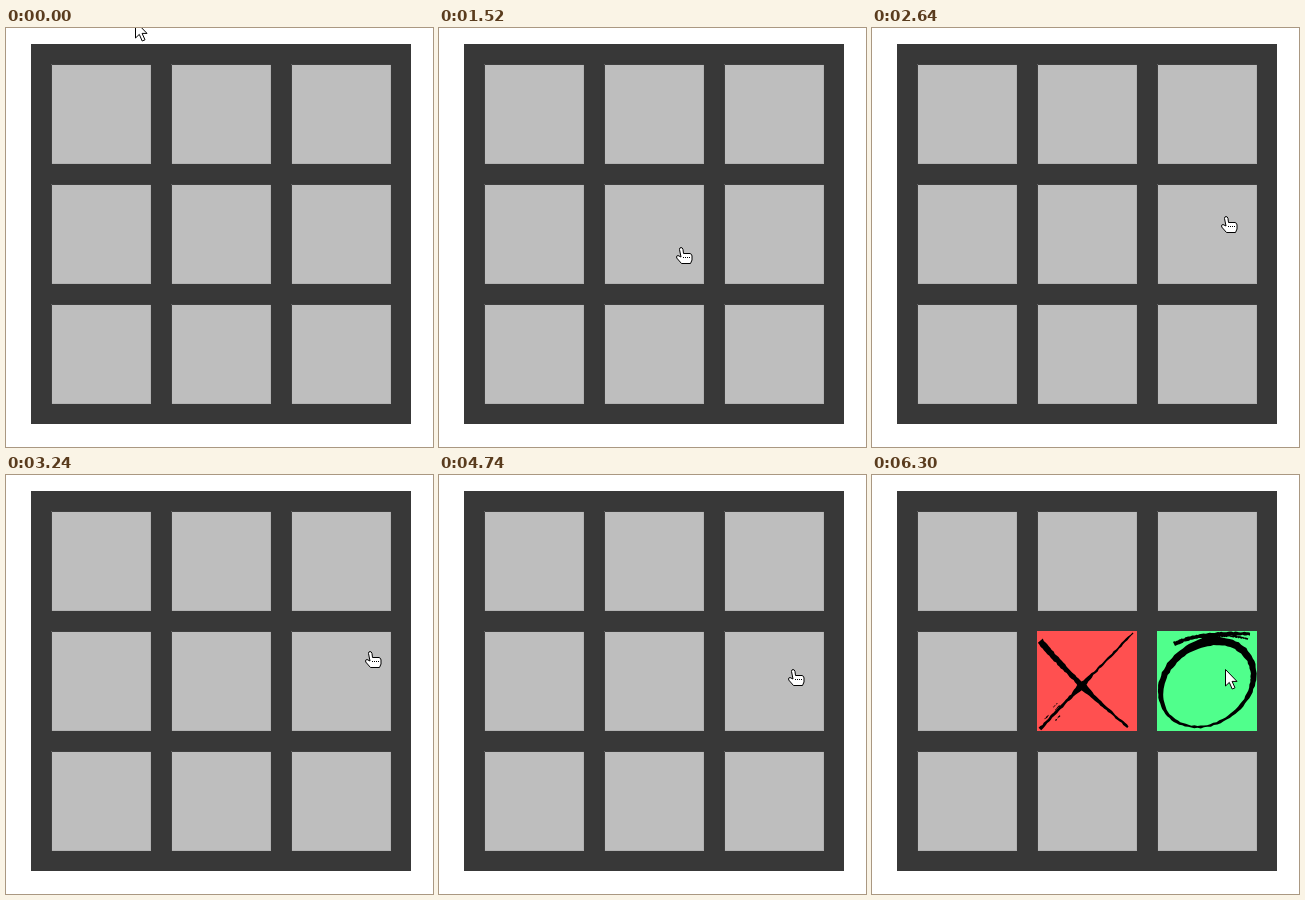
An HTML page for the animation above (8 s loop, 427x419 px).

```html
<!DOCTYPE html>
<html>
<head>
<meta charset="utf-8">
<style>
html, body { margin: 0; width: 100%; height: 100%; overflow: hidden; background: #fff; }
svg { display: block; }
</style>
</head>
<body>
<svg width="427" height="419" viewBox="0 0 427 419">
  <defs>
    <g id="cell">
      <rect width="100" height="100" fill="#b2b2b2"/>
      <rect width="99" height="99" fill="#bebebe"/>
      <path d="M.5 100V.5H100" fill="none" stroke="#404040"/>
    </g>
  </defs>
  <rect x="25" y="16" width="380" height="380" fill="#383838"/>
  <g id="cells"></g>

  <g id="cross" transform="translate(165 156)">
    <rect width="100" height="100" fill="#ff5050"/>
    <path id="crossInk"/>
  </g>
  <g id="ring" transform="translate(285 156)">
    <rect width="100" height="100" fill="#50ff8c"/>
    <path id="ringInk"/>
  </g>

  <path id="arrow" d="M.5 .5V17L4.3 13.4L7.2 20L10 18.8L7.1 12.4H12Z" fill="#fff" stroke="#000" stroke-linejoin="round"/>
  <g id="hand" fill="#fff" stroke="#000" stroke-linejoin="round">
    <path d="M3.5 2.5Q3.5 .5 5 .5T7 2.5L7.5 6.5H14Q16 7 16 9V13L14.5 16.5H5.5L.7 11Q0 8.5 2 8.5L5 10Z"/>
    <path d="M7 10.5H14" stroke-dasharray="1 1"/>
  </g>
</svg>
<script>
const $ = id => document.getElementById(id);
const LOOP = 8000, POINT = 220, GREEN = 5620, RING = 6180, CROSS = 6300;

// Each leg runs from start to end in even steps, then holds
const legs = [
  { start: 0, end: 0, steps: 1, from: [129, -7], to: [129, -7] },
  { start: 120, end: 280, steps: 4, from: [134, 6], to: [148, 42] },
  { start: 960, end: 1240, steps: 5, from: [232, 213], to: [237, 219] },
  { start: 2100, end: 2100, steps: 1, from: [244, 223], to: [244, 223] },
  { start: 2260, end: 2640, steps: 6, from: [283, 222], to: [349, 188] },
  { start: 2660, end: 2920, steps: 4, from: [351, 186], to: [359, 176] },
  { start: 4220, end: 4740, steps: 7, from: [358, 175], to: [349, 194] },
  { start: GREEN, end: GREEN, steps: 1, from: [353, 194], to: [353, 194] }
];

let seed = 7;
const random = () => (seed = seed * 16807 % 2147483647) / 2147483647;
const mix = (a, b, p) => a + (b - a) * p;

// Ragged brush outline along point(p), as thick as width(p)
function brush(point, width, n = 50) {
  const left = [], right = [];
  for (let i = 0; i <= n; i++) {
    const p = i / n, [x, y] = point(p);
    const [ax, ay] = point(p - .01), [bx, by] = point(p + .01);
    const len = Math.hypot(bx - ax, by - ay);
    const nx = (ay - by) / len, ny = (bx - ax) / len;
    const side = sign => {
      const w = sign * (width(p) / 2 + random() - .5);
      return `${(x + nx * w).toFixed(1)} ${(y + ny * w).toFixed(1)}`;
    };
    left.push(side(1));
    right.unshift(side(-1));
  }
  return `M${left.concat(right).join('L')}Z`;
}

const curve = (a, b, c) => p =>
  [0, 1].map(k => mix(mix(a[k], b[k], p), mix(b[k], c[k], p), p));
const taper = (from, to, bulge = 0) => p =>
  mix(from, to, p) + bulge * Math.exp(-(((p - .53) / .07) ** 2));

function scratches(x, y, dx, dy) {
  let d = '';
  for (let i = 0; i < 5; i++) {
    const a = [x + random() * dx, y + random() * dy];
    const b = [a[0] + dx * .3, a[1] + dy * .3];
    d += brush(curve(a, a.map((v, k) => (v + b[k]) / 2), b), () => .8, 5);
  }
  return d;
}

const TILT = -.6;
function oval(p) {
  const a = p * 2 * Math.PI - TILT;
  const x = 49.5 * Math.cos(a), y = 39.5 * Math.sin(a);
  return [
    50 + x * Math.cos(TILT) - y * Math.sin(TILT),
    53 + x * Math.sin(TILT) + y * Math.cos(TILT)
  ];
}

$('crossInk').setAttribute('d',
  brush(curve([3, 10], [43, 56], [91, 96]), taper(6.5, 2, 3)) +
  brush(curve([96, 2], [43, 56], [3, 98]), taper(2, 3, 4)) +
  scratches(5, 90, 14, -14));
$('ringInk').setAttribute('d',
  brush(oval, p => 5.3 - 3 * Math.sin(p * 2 * Math.PI), 90) +
  brush(curve([17, 13], [45, 0], [93, 3]), taper(4, 3)) +
  brush(curve([45, 8], [65, 1], [91, 8]), taper(4, 1.5)));

for (let i = 0; i < 9; i++) {
  const x = 45 + i % 3 * 120, y = 36 + Math.floor(i / 3) * 120;
  $('cells').innerHTML += `<use href="#cell" x="${x}" y="${y}"/>`;
}

function cursorAt(t) {
  const { start, end, steps, from, to } = legs.findLast(leg => leg.start <= t);
  if (t >= end) return to;
  const p = Math.floor((t - start) / (end - start) * (steps - 1)) / (steps - 1);
  return from.map((v, k) => Math.round(mix(v, to[k], p)));
}

const show = (id, on) => $(id).setAttribute('visibility', on ? 'visible' : 'hidden');

function draw() {
  const t = performance.now() % LOOP;
  const [x, y] = cursorAt(t);
  const pointing = t >= POINT && t < GREEN;
  for (const id of ['arrow', 'hand']) {
    $(id).setAttribute('transform', `translate(${x} ${y})`);
    show(id, (id === 'hand') === pointing);
  }
  show('ring', t >= GREEN);
  show('ringInk', t >= RING);
  show('cross', t >= CROSS);
  requestAnimationFrame(draw);
}
draw();
</script>
</body>
</html>
```
